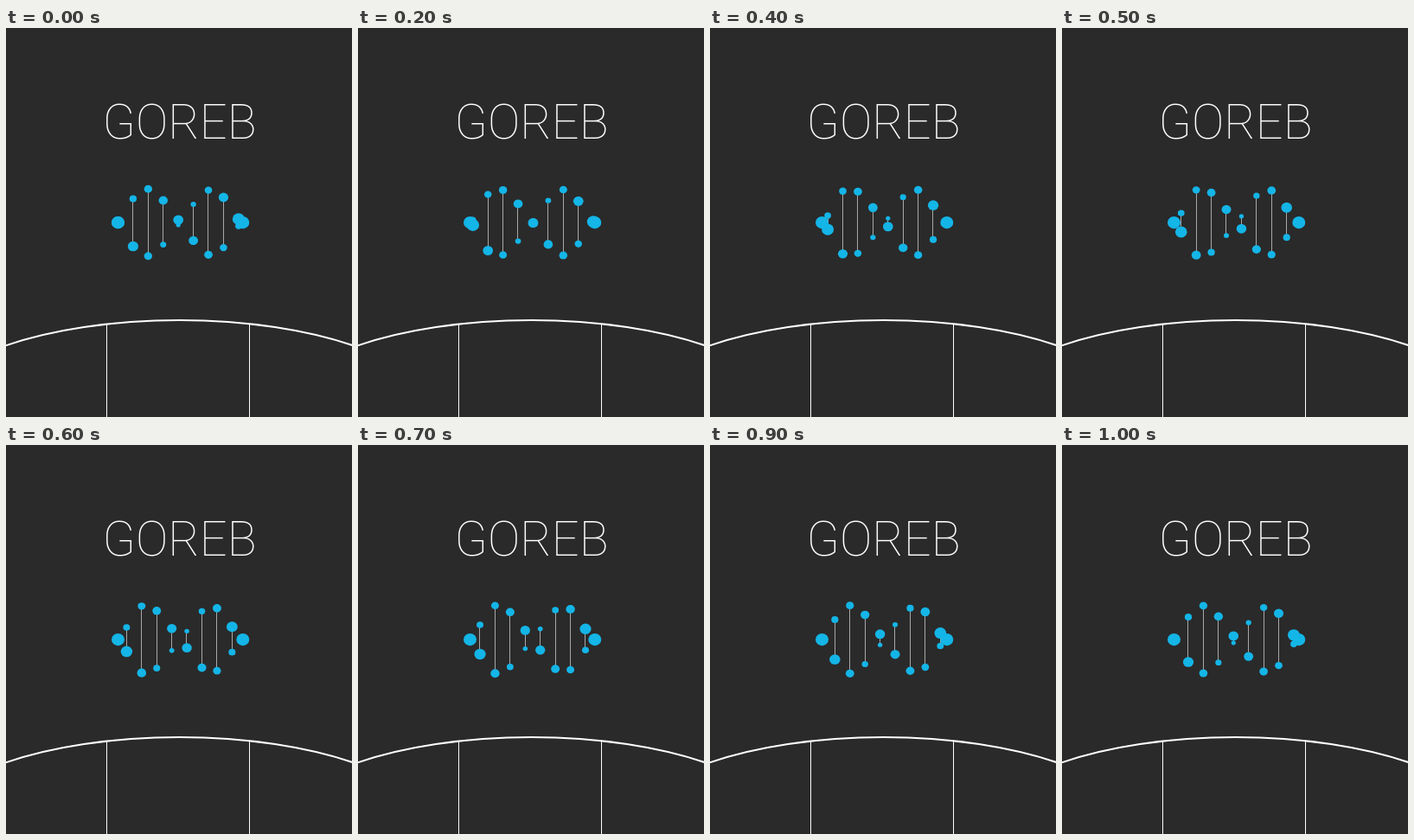
Recreate the animation shown at these times as an HTML page with a canvas. Size 400x450 px, loop 1100 ms.

```html
<!DOCTYPE html>
<html lang="en">
<head>
<meta charset="utf-8">
<title>GOREB</title>
<style>
html, body { margin: 0; width: 100%; height: 100%; overflow: hidden; background: #2a2a2a; }
canvas { display: block; width: 400px; height: 450px; }
</style>
</head>
<body>
<canvas id="stage" width="400" height="450"></canvas>
<script>
const ctx = document.getElementById("stage").getContext("2d");
const LOOP = 1100, STEP = 100;
const LEFT = 129.5, CROSS = 202, RIGHT = 273.8, MID = 225;
const BARS = 9, GAP = 17.42, SPEED = 1.65;

// Half the bar height at x: one lobe each side of the crossing, softer at the outer ends.
function swing(x) {
  const left = x < CROSS;
  const peak = left ? 160 : 238;
  const inner = left === x > peak;
  const end = inner ? CROSS : left ? LEFT : RIGHT;
  const c = Math.max(0, Math.cos((x - peak) / (end - peak) * Math.PI / 2));
  return (left ? 39.4 : -38) * c ** (inner ? 1.15 : 1.45);
}

function dot(x, y, r) {
  ctx.beginPath();
  ctx.ellipse(x, y, r, r * 0.95, 0, 0, Math.PI * 2);
  ctx.fill();
}

function line(x, y0, y1, color) {
  ctx.strokeStyle = color;
  ctx.lineWidth = 1;
  ctx.beginPath();
  ctx.moveTo(x, y0);
  ctx.lineTo(x, y1);
  ctx.stroke();
}

function backdrop() {
  ctx.fillStyle = "#2a2a2a";
  ctx.fillRect(0, 0, 400, 450);
  ctx.fillStyle = "#fff";
  ctx.font = "200 56px Roboto, sans-serif";
  ctx.textAlign = "center";
  ctx.fillText("GOREB", 200.5, 127.5);
  line(116.5, 343, 450, "#fff");
  line(281.5, 343, 450, "#fff");
  ctx.strokeStyle = "#fff";
  ctx.lineWidth = 2;
  ctx.beginPath();
  ctx.ellipse(200.5, 452, 300, 114, 0, Math.PI, Math.PI * 2);
  ctx.stroke();
}

function helix(step) {
  ctx.fillStyle = "#14b5e7";
  for (let i = 0; i < BARS; i++) {
    const x = LEFT + i * GAP + step * SPEED;
    if (x > RIGHT + 0.5) continue;
    const d = swing(x), far = Math.abs(x - CROSS) / 72;
    line(Math.floor(x - 0.1) + 0.5, MID - d, MID + d, "#a8a8a8");
    dot(x, MID + d, 2.5 + 5 * far ** 1.25);
    dot(x, MID - d, 6 - 2.3 * far ** 0.85);
  }
  dot(LEFT, MID, 7.5);
  dot(RIGHT, MID, 7.5);
}

const start = performance.now();
function frame() {
  const t = (performance.now() - start) % LOOP;
  backdrop();
  helix(Math.floor(t / STEP));
  requestAnimationFrame(frame);
}
frame();
</script>
</body>
</html>
```
